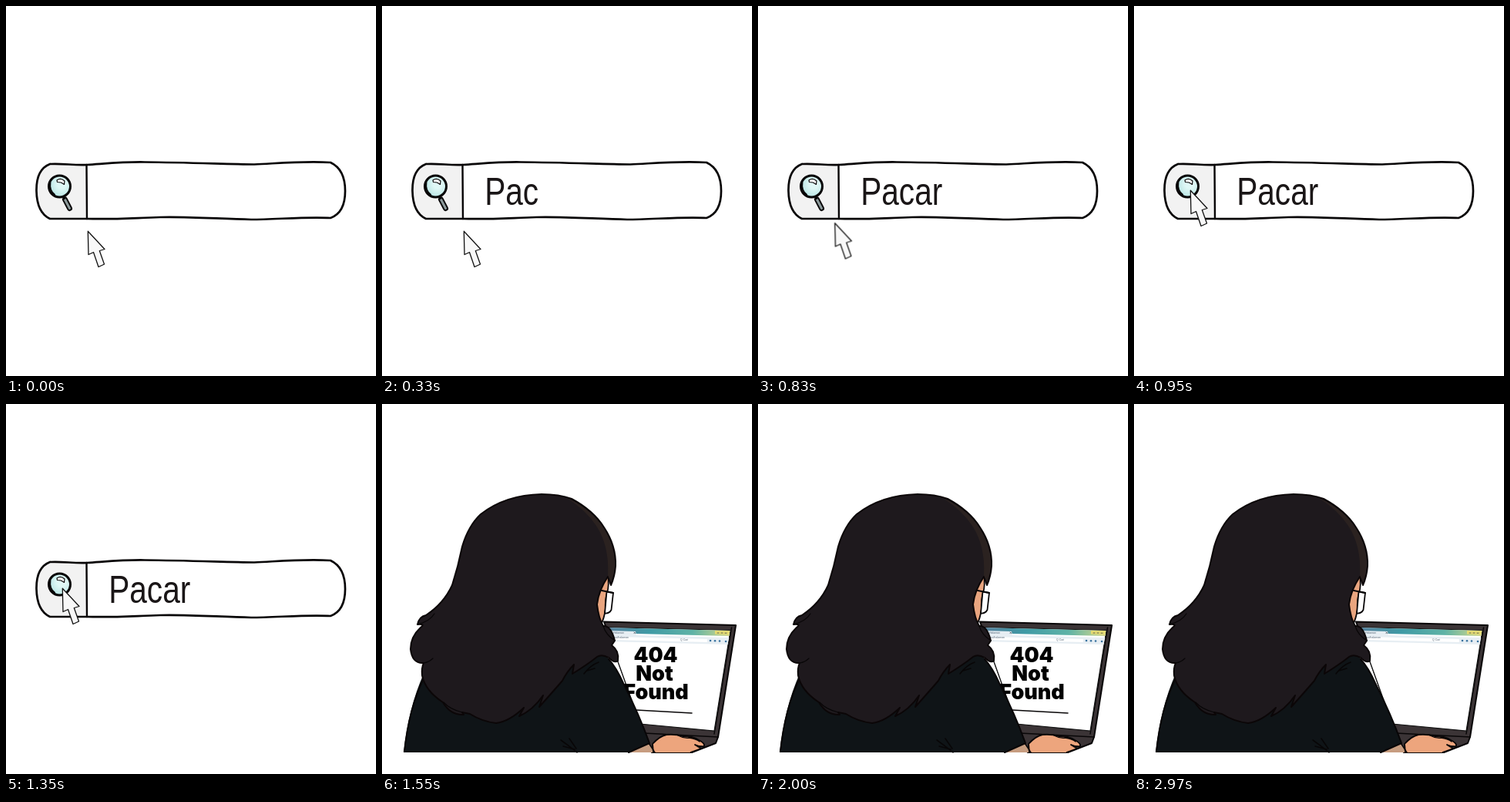
Animation, 480 px wide and 480 px high, one loop 3000 ms. Source, as an HTML page:

```html
<!DOCTYPE html>
<html lang="id">
<head>
<meta charset="utf-8">
<title>Pacar: 404</title>
<style>
html, body { margin: 0; width: 100%; height: 100%; overflow: hidden; background: #fff; }
svg { display: block; width: 100%; height: 100%; }
.line { fill: none; stroke: #080607; stroke-linecap: round; stroke-linejoin: round; }

.search, .room, .error, .cursor, .word tspan { animation: 3s step-end infinite; }
.search { animation-name: search; }
.room { animation-name: room; }
.error { animation-name: blink; font: 900 27px Inter, sans-serif; text-anchor: middle; }
.cursor { animation-name: click; transform-origin: 117px 315px; }
.word { font: 49.5px "Liberation Sans", Arial, sans-serif; fill: #1a1617; }
.word tspan:nth-child(1) { animation-name: key1; }
.word tspan:nth-child(2) { animation-name: key2; }
.word tspan:nth-child(3) { animation-name: key3; }
.word tspan:nth-child(4) { animation-name: key4; }
.word tspan:nth-child(5) { animation-name: key5; }

@keyframes key1 { 0% { fill-opacity: 0 } 4.333%, 100% { fill-opacity: 1 } }
@keyframes key2 { 0% { fill-opacity: 0 } 7.666%, 100% { fill-opacity: 1 } }
@keyframes key3 { 0% { fill-opacity: 0 } 11%, 100% { fill-opacity: 1 } }
@keyframes key4 { 0% { fill-opacity: 0 } 15.333%, 100% { fill-opacity: 1 } }
@keyframes key5 { 0% { fill-opacity: 0 } 18.666%, 100% { fill-opacity: 1 } }
@keyframes click {
  0% { transform: none }
  27.666% { transform: translate(-6.6px, -10.6px) }
  28.666% { transform: translate(-13.2px, -21.2px) }
  29.666% { transform: translate(-19.8px, -31.8px) }
  30.666% { transform: translate(-26.4px, -42.4px) }
  31.666% { transform: translate(-33px, -53px) }
  40.666% { transform: translate(-33px, -53px) scale(.86) }
  45%, 100% { transform: translate(-33px, -53px) }
}
@keyframes search { 0% { opacity: 1 } 51.666%, 100% { opacity: 0 } }
@keyframes room { 0% { opacity: 0 } 51.666%, 100% { opacity: 1 } }
@keyframes blink {
  0%, 55%, 60%, 65%, 99%, 100% { opacity: 0 }
  51.666%, 56.666%, 61.666%, 66.666% { opacity: 1 }
}
</style>
</head>
<body>
<svg viewBox="0 0 480 480">
  <defs>
    <linearGradient id="sky">
      <stop offset="0" stop-color="#587f9c"/>
      <stop offset=".35" stop-color="#3f9aa5"/>
      <stop offset=".7" stop-color="#5fb3a6"/>
      <stop offset="1" stop-color="#d8d98a"/>
    </linearGradient>
    <radialGradient id="glass" cx=".6" cy=".4" r=".65">
      <stop offset=".3" stop-color="#e0f8f6"/>
      <stop offset="1" stop-color="#b5e3e2"/>
    </radialGradient>
  </defs>

  <g class="search">
    <path fill="#f2f2f2" d="M105 206L57 205Q39 211 39 240T57 276L105 276Z"/>
    <path class="line" stroke-width="2.7" d="M57 205C75 204 88 207 105 206C135 204 155 202 180 202.500C235 203 285 205 322 205.500C355 204 385 201 421 203Q440 212 440 240T421 275C390 273 350 277 318 277C275 276 235 273 200 274C165 275 140 277 105 276L57 276Q40 268 39.500 240T57 205"/>
    <path class="line" stroke-width="2.4" d="M104.500 206L105 276"/>

    <path class="line" stroke-width="7" d="M76.500 251L82.500 262.500"/>
    <path class="line" style="stroke:#8c9a9b" stroke-width="3" d="M76.500 251L82.500 262.500"/>
    <path class="line" stroke-width="2" d="M74 246L76 250"/>
    <circle cx="69.500" cy="234" r="14" fill="url(#glass)" stroke="#080607" stroke-width="3"/>
    <path class="line" stroke-width="1.800" d="M57.500 229Q56 239 63 244.500"/>
    <path d="M66 226Q71 222.500 76 227L75.500 231.500L71.500 229L66.500 228.500Z" fill="#fff" stroke="#080607" stroke-width="1.200" stroke-linejoin="round"/>

    <text class="word" transform="translate(133.200 257.500) scale(.82 1)"><tspan>P</tspan><tspan>a</tspan><tspan>c</tspan><tspan>a</tspan><tspan>r</tspan></text>

    <path class="cursor" fill="#f8f8f8" stroke="#111" stroke-width="1.300" stroke-linejoin="round" d="M106.300 292.200L107 322.500L113.500 319.500L120 338.500L127.500 335L121.300 317.500L128 315.500Z"/>
  </g>

  <g class="room">
    <!-- laptop -->
    <path fill="#3b3436" stroke="#080607" stroke-width="2" stroke-linejoin="round" d="M288 282.500L459 287L436 432L433 440L402 452H350L340 428Z"/>
    <path class="line" stroke-width="1.500" d="M340 427L436 432M453.500 290L431 428"/>
    <path fill="#fff" stroke="#111" stroke-width="1.200" d="M290 289.500L452 293.500L431 424L335 415Z"/>
    <path fill="url(#sky)" d="M290 290L451.500 294L450.500 301L290 297Z"/>
    <path fill="#e7eef3" d="M290 294L329 295L330 300L450.300 303L448.500 312L290 308Z"/>
    <path fill="#fff" d="M300 302L422 305L422 309L300 306Z"/>
    <path fill="#e8dc72" d="M432 294L451 294.500L450 299L432 298.500Z"/>
    <path class="line" style="stroke:#3c4b55" stroke-width=".8" d="M435 297h2m3 0h2m3 .2h2M327 296l1.500 1.500m0-1.500l-1.500 1.500"/>
    <g fill="#567" font-family="Liberation Sans, sans-serif" font-size="3.500">
      <text x="300" y="298">Halaman</text>
      <text x="300" y="304">cari/halaman</text>
      <text x="387" y="307">Q Cari</text>
    </g>
    <g fill="#39729f">
      <circle cx="426" cy="307" r="1.300"/><circle cx="432" cy="307.300" r="1.300"/>
      <circle cx="438" cy="307.500" r="1.300"/><circle cx="446" cy="308" r="1.300"/>
    </g>
    <g class="error">
      <text x="355" y="335">404</text>
      <text x="353.500" y="358.500">Not</text>
      <text x="355.500" y="383">Found</text>
      <path class="line" stroke-width="1.500" d="M330 397L402 401"/>
    </g>

    <!-- hand and arm -->
    <path fill="#c79d80" d="M318 452L346 440L354 452Z"/>
    <path fill="#eda57d" stroke="#080607" stroke-width="1.800" stroke-linejoin="round" d="M352 452L351 441Q360 431 369 429Q381 428 390 431Q404 431 411 436Q419 440 418 444Q413 445 406 442L414 447L400 452"/>
    <path class="line" stroke-width="1.400" d="M384 430Q391 434 399 433M398 433Q407 434 412 438M346 440L354 452"/>

    <!-- face and glasses -->
    <path fill="#e9a57f" stroke="#080607" stroke-width="1.800" d="M293 222Q295 235 292 245Q289 255 290 266Q288 279 284 286L270 280V240Z"/>
    <path fill="#fff" stroke="#080607" stroke-width="1.800" stroke-linejoin="round" d="M291.500 243.500L300 245L297.500 267Q295 272 289 271.500Z"/>
    <path class="line" stroke-width="2" d="M280 241L300 245"/>

    <!-- shirt -->
    <path fill="#0f1417" d="M54 350Q34 395 28 452H319L347 440Q335 404 312 360Q302 338 292 328L270 320H80Z"/>
    <path class="line" stroke-width="2" d="M54 356Q35 395 29 451M294 331Q304 342 313 362Q334 404 347 440L320 452"/>
    <path class="line" stroke-width="1.600" d="M232 436Q242 443 253 452M235 444L250 448M243 434L252 447M262 350Q270 339 281 335M266 346L276 343"/>

    <!-- hair -->
    <path fill="#1e191d" stroke="#0b0607" stroke-width="2" stroke-linejoin="round" d="M207 117Q230 117 246 123Q274 138 288 160Q304 184 303 210Q302 224 297 235L293 224Q281 242 279 260Q281 278 287 288Q297 287 302 307L298 313Q308 320 306 333Q302 337 294 329Q285 324 279 328Q268 337 247 350L249 338Q240 347 234 359Q221 374 204 393L209 378Q196 397 178 405L184 394Q165 412 148 414Q130 412 114 402L104 400L106 403Q89 404 79 387Q56 372 52 352Q51 343 54 336Q39 337 37 318Q37 302 50 290Q57 285 46 286Q48 276 57 274Q80 259 91 235Q99 210 104 185Q112 158 128 143Q160 118 207 117Z"/>
    <path fill="#2b2220" d="M240 122Q272 137 287 160.500Q302 184 302 210Q301 221 297 231L293 222Q295 184 278 158Q265 138 240 122Z"/>
    <path class="line" stroke-width="1.200" d="M46 286Q62 282 68 272M54 336Q61 335 66 330M287 288Q290 299 302 307M80 387Q88 396 104 400"/>
  </g>
</svg>
</body>
</html>
```
